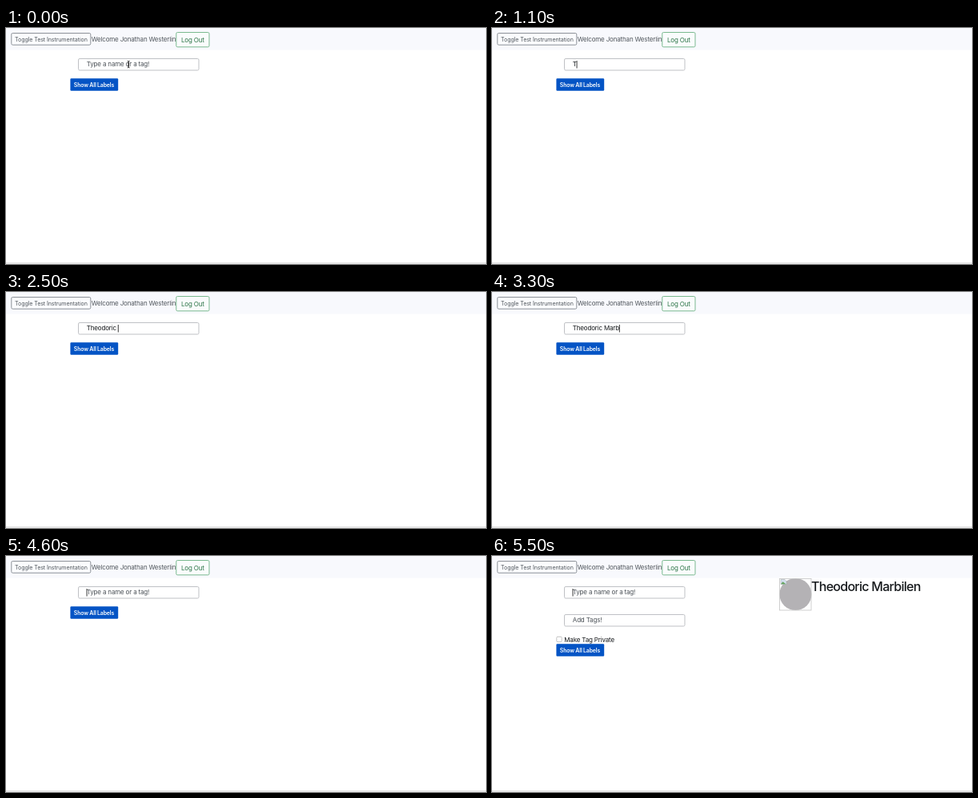
An HTML page that plays this animation: 600x296 px, repeating every 5600 ms.

```html
<!DOCTYPE html>
<html lang="en">
<head>
<meta charset="utf-8">
<title>Tag search</title>
<style>
  html, body { margin: 0; width: 100%; height: 100%; overflow: hidden; background: #fff; }
  svg { display: block; width: 600px; height: 296px; }
  text { font: 8px Inter, "Open Sans", sans-serif; letter-spacing: -.17px; fill: #15181b; white-space: pre; }
  .small { font-size: 7.1px; letter-spacing: -.1px; }
  .muted { fill: #50565c; }
  .hint { fill: #4b5157; }
  .field { fill: #fff; stroke: #bfc1c5; }
  .strong { font-size: 6.9px; font-weight: 600; letter-spacing: -.15px; fill: #fff; }
  .title { font-size: 16px; font-weight: 500; letter-spacing: -.72px; }
</style>
</head>
<body>
<svg viewBox="0 0 600 296">
  <rect width="600" height="27.5" fill="#f8f9fd"/>
  <rect x="6.8" y="6.5" width="99" height="14.7" rx="1.6" fill="#fbfcfe" stroke="#8c9197"/>
  <text class="small muted" x="11.1" y="16.6">Toggle Test Instrumentation</text>
  <text class="muted" x="106.7" y="16.8">Welcome Jonathan Westerlin</text>
  <rect x="212.8" y="5.5" width="41.2" height="18.3" rx="1.6" fill="#fafcfd" stroke="#7ab98f"/>
  <text x="219" y="17.9" style="fill:#2c7547">Log Out</text>

  <rect class="field" x="90.5" y="38.5" width="150.5" height="14.5" rx="1.6"/>
  <text id="entry" x="100.8" y="48.4"></text>
  <rect id="caret" y="41" width=".9" height="9.5" fill="#222"/>
  <path id="pointer" d="M151.8 41.3q1.4 0 1.4 1.2v6.2q0 1.2-1.4 1.2M154.6 41.3q-1.4 0-1.4 1.2v6.2q0 1.2 1.4 1.2" fill="none" stroke="#222" stroke-width=".9"/>

  <g id="result">
    <rect class="field" x="90.5" y="73.5" width="150.5" height="14.5" rx="1.6"/>
    <text class="hint" x="100.8" y="83.4">Add Tags!</text>
    <rect x="80.8" y="101.3" width="6.4" height="6.4" rx="1.2" fill="#fff" stroke="#b4b4b4" stroke-width=".8"/>
    <text x="90.3" y="107.7">Make Tag Private</text>
    <circle cx="379.4" cy="48" r="20" fill="#b4b2b5"/>
    <rect x="359.5" y="28.5" width="39.5" height="39.5" fill="none" stroke="#c4c4c4" stroke-width=".8"/>
    <path d="M361 29.5h5l2 2v4h-7z" fill="#d3dfef" stroke="#a2a8a8" stroke-width=".5"/>
    <path d="M361 35.3l2.5-3 4 3z" fill="#64a35d"/>
    <text class="title" x="399" y="43.8">Theodoric Marbilen</text>
  </g>

  <g id="labels">
    <rect x="80.4" y="63.3" width="59.8" height="15.5" rx="1.2" fill="#0454c5"/>
    <text class="strong" x="84.8" y="73.8">Show All Labels</text>
  </g>
  <rect y="294.4" width="600" height="1" fill="#cfcfd1"/>
</svg>
<script>
const LOOP = 5600;
const NAME = "Theodoric Marbilen";
const HINT = "Type a name or a tag!";
const TEXT_X = 100.8;

// [start in ms, value]
const typed = [[0, 0], [1100, 1], [1300, 2], [1400, 3], [1500, 4], [1800, 5],
  [1900, 6], [2000, 7], [2100, 8], [2300, 9], [2500, 10], [2600, 11], [2800, 12],
  [3000, 13], [3300, 14], [3500, 15], [3700, 16], [3900, 17], [4100, 18], [4400, 0]];
const caretOn = [[0, false], [300, true], [800, false], [1100, true], [4900, false], [5400, true]];
const pointerOn = [[0, true], [1000, false]];
const resultOn = [[0, false], [4900, true]];

const byId = id => document.getElementById(id);
const [entry, caret, pointer, result, labels] =
  ["entry", "caret", "pointer", "result", "labels"].map(byId);

// Measured at ten times the size for sub-pixel precision.
const pen = document.createElement("canvas").getContext("2d");
pen.font = '80px Inter, "Open Sans", sans-serif';
pen.letterSpacing = "-1.7px";

const at = (steps, t) => steps.findLast(([start]) => start <= t)[1];
const show = (node, on) => node.setAttribute("visibility", on ? "visible" : "hidden");

function draw(t) {
  const text = NAME.slice(0, at(typed, t));
  const found = at(resultOn, t);
  entry.textContent = text || HINT;
  entry.setAttribute("class", text ? "" : "hint");
  caret.setAttribute("x", TEXT_X - .2 + pen.measureText(text).width / 10);
  show(caret, at(caretOn, t));
  show(pointer, at(pointerOn, t));
  show(result, found);
  labels.setAttribute("transform", `translate(0 ${found ? 47 : 0})`);
}

const begin = performance.now();
function tick() {
  draw((performance.now() - begin) % LOOP);
  requestAnimationFrame(tick);
}
tick();
</script>
</body>
</html>
```
